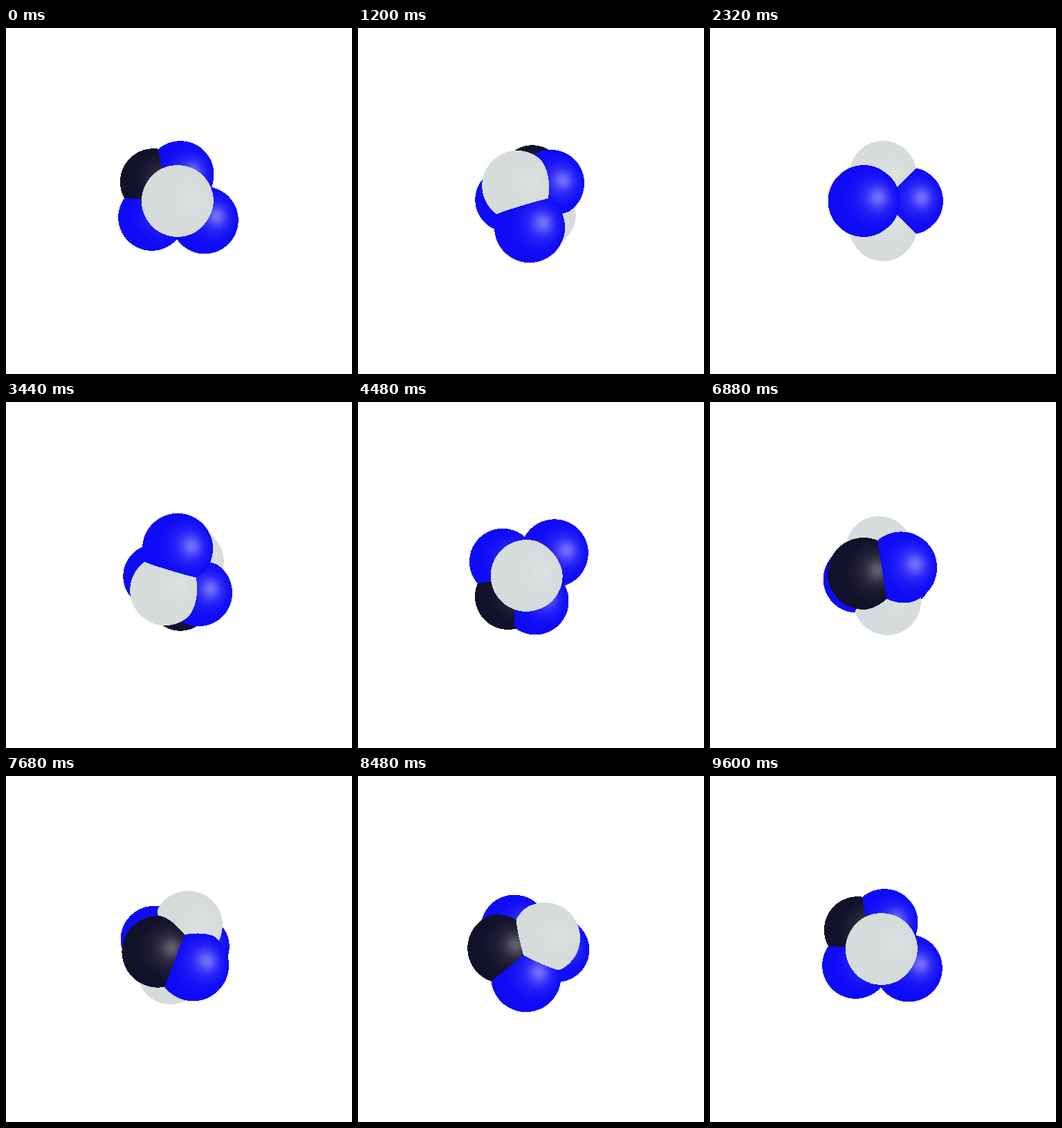
These frames come from a looping animation (500 by 500 pixels, 9.68 s). An HTML page with a canvas:

```html
<!DOCTYPE html>
<html>
<head>
<meta charset="utf-8">
<style>
  html, body { margin: 0; width: 500px; height: 500px; overflow: hidden; background: #fff; }
  canvas { display: block; }
</style>
</head>
<body>
<canvas id="stage" width="500" height="500"></canvas>
<script>
const ctx = document.getElementById('stage').getContext('2d');
const STEP = 80, STEPS = 121;
const EYE = 570, RADIUS = 48.3;
const ORIGIN = 150, SIZE = 200;
const LIGHT = [280, 75, 340];

const BLUE = { base: [14, 10, 246], shine: [100, 100, 4] };
const BLACK = { base: [18, 17, 42], shine: [78, 78, 66] };
const WHITE = { base: [214, 219, 219], shine: [7, 6, 6] };

const atoms = [
  { at: [0, 0, 38], paint: WHITE },
  { at: [0, 0, -38], paint: WHITE },
  { at: [0, 38, 0], paint: BLUE },
  { at: [38, -25.4, 0], paint: BLUE },
  { at: [-38, -25.4, 0], paint: BLUE },
  { at: [-38, 25.4, 0], paint: BLACK }
];

const image = ctx.createImageData(SIZE, SIZE);

// Turn about the body's y axis, then roll about the viewing axis by the same angle.
function rotate([x, y, z], angle) {
  const c = Math.cos(angle), s = Math.sin(angle);
  const turned = x * c + z * s;
  return [turned * c - y * s, turned * s + y * c, z * c - x * s];
}

// Highlight from a point light near the viewer: a soft glow with a tighter core.
function highlight(p, center) {
  const lx = LIGHT[0] - p[0], ly = LIGHT[1] - p[1], lz = LIGHT[2] - p[2];
  const vz = EYE - p[2];
  const l = Math.hypot(lx, ly, lz), v = Math.hypot(p[0], p[1], vz);
  const hx = lx / l - p[0] / v, hy = ly / l - p[1] / v, hz = lz / l + vz / v;
  const dot = (p[0] - center[0]) * hx + (p[1] - center[1]) * hy + (p[2] - center[2]) * hz;
  const facing = Math.max(0, dot / RADIUS / Math.hypot(hx, hy, hz));
  return 0.4 * facing ** 5 + 0.6 * facing ** 24;
}

function render(angle) {
  const spheres = atoms.map(({ at, paint }) => {
    const center = rotate(at, angle);
    const [x, y, z] = center;
    return { center, paint, c: x * x + y * y + (EYE - z) ** 2 - RADIUS ** 2 };
  });
  image.data.fill(255);
  for (let row = 0; row < SIZE; row++) {
    for (let col = 0; col < SIZE; col++) {
      const dx = ORIGIN + col + 0.5 - 250, dy = 250 - ORIGIN - row - 0.5;
      const a = dx * dx + dy * dy + EYE * EYE;
      let near = Infinity, hit = null;
      for (const sphere of spheres) {
        const [x, y, z] = sphere.center;
        const b = dx * x + dy * y + EYE * (EYE - z);
        const disc = b * b - a * sphere.c;
        if (disc < 0) continue;
        const t = (b - Math.sqrt(disc)) / a;
        if (t < near) { near = t; hit = sphere; }
      }
      if (!hit) continue;
      const shine = highlight([dx * near, dy * near, EYE * (1 - near)], hit.center);
      const i = (row * SIZE + col) * 4;
      for (let k = 0; k < 3; k++) {
        image.data[i + k] = hit.paint.base[k] + hit.paint.shine[k] * shine;
      }
    }
  }
  ctx.putImageData(image, ORIGIN, ORIGIN);
}

let shown = -1;
function tick() {
  const step = Math.floor(performance.now() / STEP) % STEPS;
  if (step !== shown) {
    shown = step;
    render(-(step + 1) * Math.PI / 60);
  }
  requestAnimationFrame(tick);
}
tick();
</script>
</body>
</html>
```
